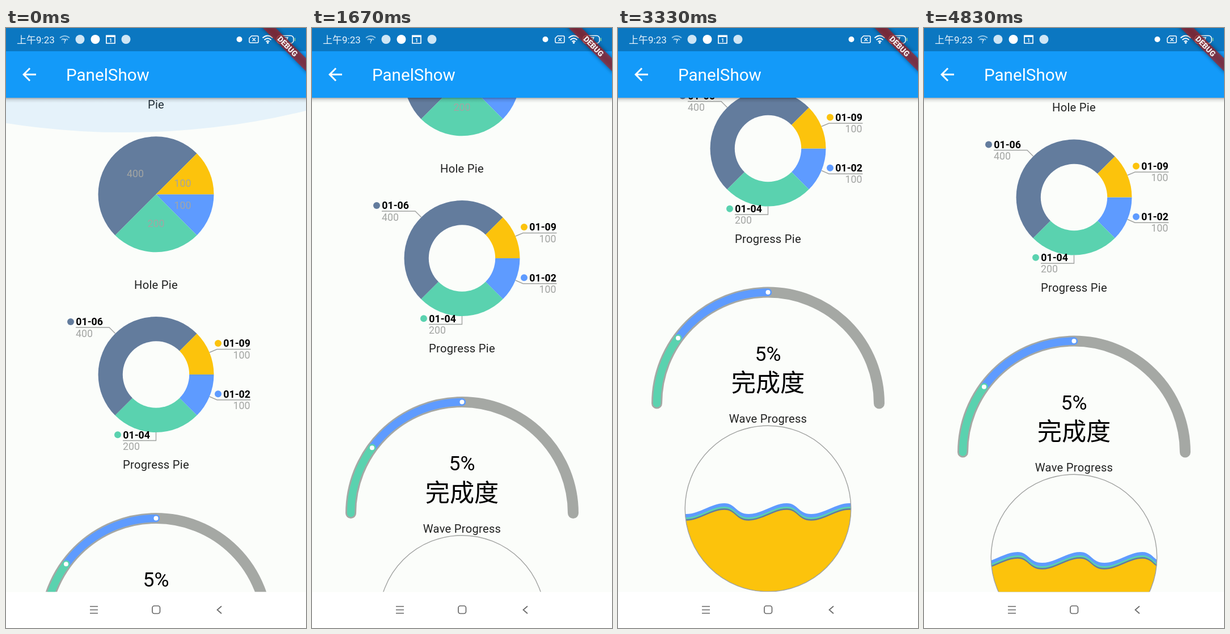
An HTML page for the animation above (5000 ms loop, 529 px wide and 1058 px high).

```html
<!DOCTYPE html>
<html lang="zh">
<head>
<meta charset="utf-8">
<title>Charts</title>
<style>
  html, body { margin: 0; width: 100%; height: 100%; overflow: hidden; background: #fff; }
  svg { display: block; width: 529px; height: 1058px; }
  text { font-family: Roboto, "Noto Sans CJK SC", "Noto Sans CJK", sans-serif; }
  .head { font-size: 20.2px; letter-spacing: .25px; text-anchor: middle; fill: #202120; }
  .num { font-size: 17.8px; fill: #a3a5a3; }
  .key { font-size: 17.8px; font-weight: 700; fill: #000; }
  .mid { text-anchor: middle; }
  .end { text-anchor: end; }
  .line { fill: none; stroke: #a0a2a0; stroke-width: 1.4; }
  .arc { fill: none; stroke-linecap: round; }
</style>
</head>
<body>
<svg viewBox="0 0 529 1058">
  <defs>
    <clipPath id="view"><rect y="123" width="529" height="871.5"/></clipPath>
    <clipPath id="bowl"><circle cx="264.5" cy="1246" r="146.3"/></clipPath>
    <linearGradient id="shade" x2="0" y2="1">
      <stop stop-color="#000" stop-opacity=".3"/>
      <stop offset=".4" stop-color="#000" stop-opacity=".1"/>
      <stop offset="1" stop-color="#000" stop-opacity="0"/>
    </linearGradient>
    <filter id="soft" x="-20%" y="-100%" width="140%" height="300%"><feGaussianBlur stdDeviation="3.5"/></filter>
  </defs>

  <rect width="529" height="1058" fill="#fbfdfa"/>
  <g clip-path="url(#view)">
    <g id="page">
      <text class="head" x="264.5" y="142">Pie</text>
      <g id="pie"></g>
      <text class="head" x="264.5" y="459.5">Hole Pie</text>
      <g id="ring"></g>
      <text class="head" x="264.5" y="777">Progress Pie</text>
      <g id="gauge"></g>
      <text class="mid" x="264.5" y="985" font-size="35.5">5%</text>
      <text class="mid" x="264.5" y="1039.5" font-size="43.2" font-weight="300">完成度</text>
      <text class="head" x="264.5" y="1094.5">Wave Progress</text>
      <g id="waves" clip-path="url(#bowl)"></g>
      <circle class="line" cx="264.5" cy="1246" r="146.3"/>
    </g>
    <ellipse id="glowTop" cx="210" fill="#2196f3"/>
    <ellipse id="glowEnd" cx="200" fill="#2196f3"/>
    <rect y="123" width="529" height="9" fill="url(#shade)"/>
  </g>

  <!-- status bar and title bar -->
  <rect width="529" height="123" fill="#139af9"/>
  <rect width="529" height="41" fill="#0b77c1"/>
  <text x="19" y="27" font-size="17" fill="#e9f4fb">上午9:23</text>
  <g fill="none" stroke="#8fc4e6" stroke-width="2">
    <path d="M95 17.5Q103.500 10.500 112 17.500M98 21Q100 19 101.500 18.700M109 21Q107.500 19.500 106 18.800"/>
    <text x="103.500" y="27" font-size="11" font-weight="700" fill="#e9f4fb" stroke="none" class="mid">?</text>
  </g>
  <circle cx="130.500" cy="20" r="8" fill="#cfe6f5"/>
  <circle cx="157.500" cy="20" r="8" fill="#fff"/>
  <path d="M177 14H192V27H177Z" fill="none" stroke="#fff" stroke-width="1.700"/>
  <path d="M176.200 12.500H192.800V16H176.200Z" fill="#fff"/>
  <text class="mid" x="184.500" y="25" font-size="9.500" font-weight="700" fill="#fff">1</text>
  <circle cx="211.500" cy="20" r="8" fill="#cfe6f5"/>
  <circle cx="411.500" cy="20" r="5" fill="#fff"/>
  <g fill="none" stroke="#fff" stroke-width="1.500">
    <path d="M433 14H443Q445 14 445 16V24Q445 26 443 26H431Q429 26 429 24V18ZM434.500 17.500L440 23M440 17.500L434.500 23"/>
    <path stroke-width="2" d="M452.500 17.500Q461.500 9.500 470.500 17.500M455.500 21Q461.500 15.500 467.500 21M458.500 24Q461.500 21.500 464.500 24"/>
    <rect x="478" y="13.500" width="29" height="13.500" rx="5"/>
    <path d="M509.500 17.500V23" stroke="#8fd48f"/>
  </g>
  <circle cx="461.500" cy="26" r="1.800" fill="#fff"/>
  <text class="mid" x="494.500" y="25" font-size="13" font-weight="700" fill="#fff">7</text>
  <path transform="translate(23 64) scale(1.5)" fill="#fff" d="M20 11H7.830l5.590-5.590L12 4l-8 8 8 8 1.410-1.410L7.830 13H20z"/>
  <text x="106" y="93" font-size="29.6" fill="#fff">PanelShow</text>
  <g transform="translate(529 0) rotate(45)">
    <rect x="-60" y="37.700" width="120" height="16.200" fill="#000" opacity=".45" filter="url(#soft)"/>
    <rect x="-60" y="37.700" width="120" height="16.200" fill="#b71c1c" opacity=".63"/>
    <text class="mid" y="50.700" font-size="13.700" font-weight="900" fill="#f4eeee">DEBUG</text>
  </g>

  <!-- navigation bar -->
  <rect y="994.500" width="529" height="63.500" fill="#fff"/>
  <g fill="none" stroke="#686868" stroke-width="1.700">
    <path d="M148 1020H162M148 1026H162M148 1032H162"/>
    <rect x="258" y="1019" width="13.500" height="13.500" rx="3.500"/>
    <path d="M380 1019.500L372.500 1026L380 1032.500"/>
  </g>
</svg>

<script>
const BLUE = '#5e9bff', GREEN = '#5ad2af', SLATE = '#637c9d', GOLD = '#fcc30c', GREY = '#a5a8a4';
const CX = 264.5, LOOP = 5000;
const $ = id => document.getElementById(id);

function add(parent, tag, attrs, text) {
  const el = document.createElementNS('http://www.w3.org/2000/svg', tag);
  for (const k in attrs) el.setAttribute(k, attrs[k]);
  if (text) el.textContent = text;
  return parent.appendChild(el);
}

// Point on a circle, degrees clockwise from the right
function polar(cy, r, deg) {
  const a = deg * Math.PI / 180;
  return `${CX + r * Math.cos(a)} ${cy + r * Math.sin(a)}`;
}

const SLICES = [[0, 45, BLUE], [45, 135, GREEN], [135, 315, SLATE], [315, 360, GOLD]];

function drawSlices(parent, cy) {
  for (const [from, to, fill] of SLICES)
    add(parent, 'path', { fill, d: `M${CX} ${cy}L${polar(cy, 102, from)}A102 102 0 0 1 ${polar(cy, 102, to)}Z` });
}

function drawPie() {
  drawSlices($('pie'), 293.3);
  for (const [x, y, v] of [[228, 263, 400], [311.5, 280, 100], [311.5, 319, 100], [264.5, 350.5, 200]])
    add($('pie'), 'text', { class: 'num mid', x, y }, v);
}

function drawRing() {
  const ring = $('ring');
  drawSlices(ring, 611);
  add(ring, 'circle', { cx: CX, cy: 611, r: 58.7, fill: '#fbfdfa' });
  const labels = [
    [114, 518, SLATE, '01-06', 400, 'M123 528H182L192.500 538.500'],
    [374, 556, GOLD, '01-09', 100, 'M359 572L372 566.500H431.500'],
    [374, 645.3, BLUE, '01-02', 100, 'M359 650L372 655.700H431.500'],
    [197, 717.3, GREEN, '01-04', 200, 'M206 727.500H264.500V713']
  ];
  for (const [x, y, fill, name, value, d] of labels) {
    const right = x > CX;
    add(ring, 'path', { class: 'line', d });
    add(ring, 'circle', { cx: x, cy: y, r: 6, fill });
    add(ring, 'text', { class: 'key', x: x + 9.3, y: y + 6.2 }, name);
    add(ring, 'text', { class: right ? 'num end' : 'num', x: right ? 430.5 : x + 9, y: y + 26.5 }, value);
  }
}

function drawGauge() {
  const cy = 1060.5, r = 196;
  for (const [from, to, stroke, width] of [[180, 360, GREY, 19], [216, 270, BLUE, 13.5], [180, 216, GREEN, 13.5]])
    add($('gauge'), 'path', {
      class: 'arc', stroke, 'stroke-width': width,
      d: `M${polar(cy, r, from)}A${r} ${r} 0 0 1 ${polar(cy, r, to)}`
    });
  for (const deg of [216, 270]) {
    const [cx, y] = polar(cy, r, deg).split(' ');
    add($('gauge'), 'circle', { cx, cy: y, r: 4, fill: '#fff' });
  }
}

// Slow rise, steep fall, repeated every 110 px
function wavePath() {
  let d = 'M-110 1400V1236.500';
  for (let x = -110; x < 660; x += 110)
    d += `C${x + 20} 1236.500 ${x + 20} 1255.500 ${x + 43} 1255.500S${x + 87} 1236.500 ${x + 110} 1236.500`;
  return d + 'V1400Z';
}

function drawWaves() {
  const d = wavePath();
  return [[BLUE, 0], [GREEN, 6], [SLATE, 9], [GOLD, 11.7]].map(([fill, dy]) =>
    ({ dy, el: add($('waves'), 'path', { fill, d }) }));
}

drawPie();
drawRing();
drawGauge();
const waves = drawWaves();

// [time, value] steps
const SCROLL = [[830, 0], [1000, 12], [1170, 46], [1330, 91.5], [1500, 150], [1670, 205], [1830, 250],
  [2000, 282], [2170, 297], [2330, 322], [2500, 372], [2670, 398.5], [4170, 398.5], [4330, 385],
  [4500, 350], [4670, 322], [4830, 312.5]];
const TOP_SIZE = [[0, .575], [170, .42], [330, .2], [500, 0]];
const TOP_FADE = [[0, .1], [170, .065], [330, .03], [500, 0]];
const END_SIZE = [[2500, 0], [2670, .705], [2830, .5], [3000, .25], [3170, 0]];
const END_FADE = [[2500, 0], [2670, .075], [2830, .05], [3000, .025], [3170, 0]];

function at(steps, t) {
  if (t <= steps[0][0]) return steps[0][1];
  for (let i = 1; i < steps.length; i++) {
    const [t0, a] = steps[i - 1], [t1, b] = steps[i];
    if (t <= t1) return a + (b - a) * (t - t0) / (t1 - t0);
  }
  return steps[steps.length - 1][1];
}

function setGlow(el, edge, dir, size, fade) {
  el.setAttribute('rx', 793.5);
  el.setAttribute('ry', 793.5 * size);
  el.setAttribute('cy', edge - dir * 687.2 * size);
  el.setAttribute('opacity', fade);
}

// The picture advances six times a second
function hold(t) {
  const r = t % 500;
  return t - r + (r < 170 ? 0 : r < 330 ? 170 : 330);
}

function render(time) {
  const t = hold(time % LOOP);
  $('page').setAttribute('transform', `translate(0 ${-at(SCROLL, t)})`);
  const crest = (205 - .015 * (t - 2170)) % 110;
  for (const { el, dy } of waves) el.setAttribute('transform', `translate(${crest} ${dy})`);
  setGlow($('glowTop'), 123, 1, at(TOP_SIZE, t), at(TOP_FADE, t));
  setGlow($('glowEnd'), 994.5, -1, at(END_SIZE, t), at(END_FADE, t));
}

const start = performance.now();
function tick() {
  render(performance.now() - start);
  requestAnimationFrame(tick);
}
tick();
</script>
</body>
</html>
```
